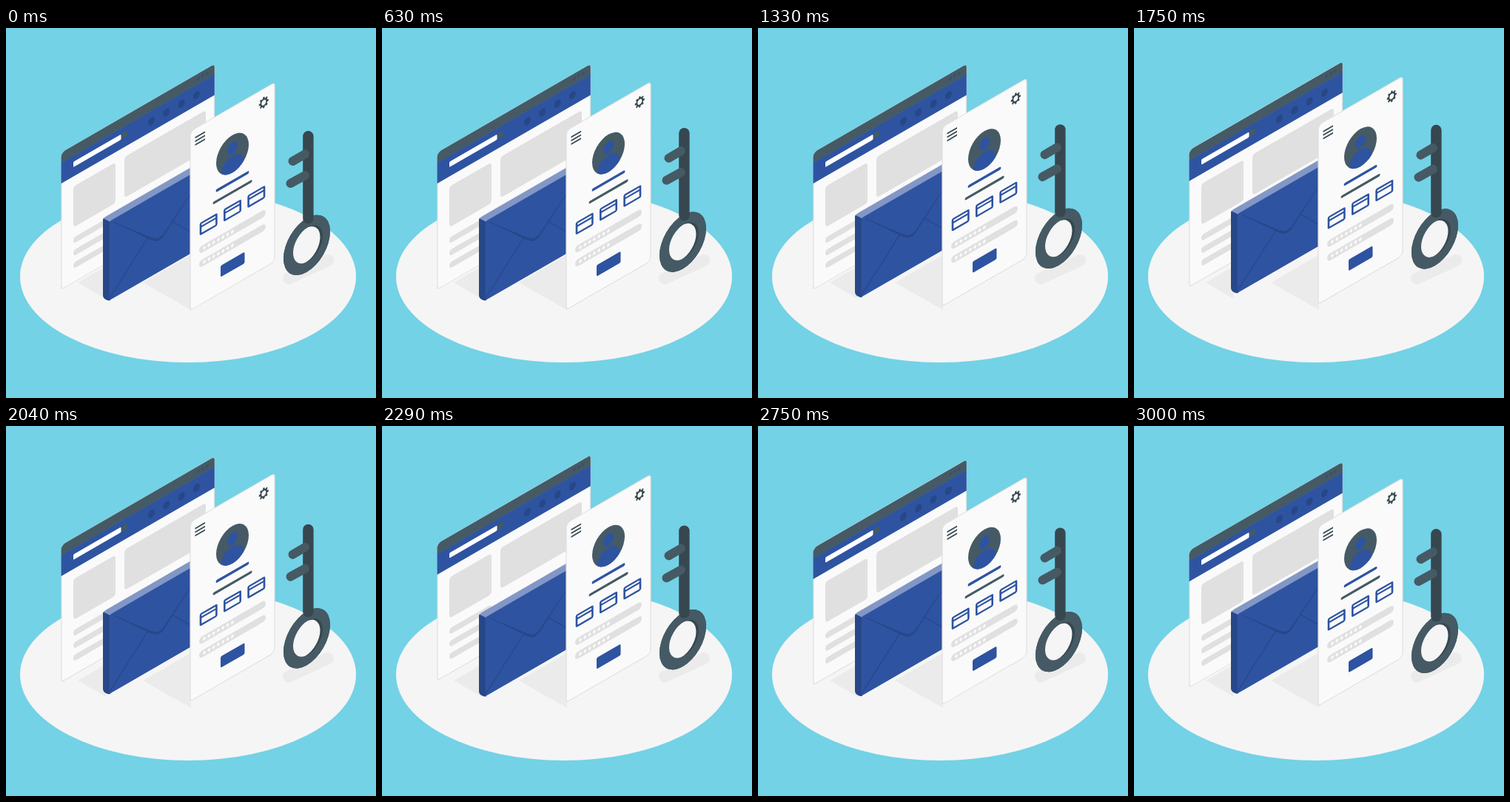
These frames come from a looping animation (500 px wide and 500 px high, 3.04 s). An HTML page with a canvas:

```html
<!DOCTYPE html>
<html lang="en">
<head>
<meta charset="utf-8">
<title>Floating account scene</title>
<style>
html, body { margin: 0; width: 100%; height: 100%; overflow: hidden; background: #73d2e6; }
canvas { display: block; width: 500px; height: 500px; }
</style>
</head>
<body>
<canvas id="stage"></canvas>
<script>
const canvas = document.getElementById('stage');
const ctx = canvas.getContext('2d');
const dpr = window.devicePixelRatio || 1;
canvas.width = canvas.height = 500 * dpr;

const LOOP = 3040, FPS = 24;
const SLOPE = Math.tan(Math.PI / 6), TALL = 2 / Math.sqrt(3);
const SKY = '#73d2e6', FLOOR = '#f5f5f5', SHADE = '#ebebeb', PAPER = '#fafafa', GREY = '#e0e0e0';
const BLUE = '#2e53a1', NAVY = '#274788', PALE = '#8297c6', SLATE = '#455a64', DARK = '#37474f';

// Linear rise and fall by 10px, starting after a delay
function lift(t, delay, period) {
  if (t < delay) return 0;
  const p = ((t - delay) / period) % 1;
  return 10 * (1 - Math.abs(2 * p - 1));
}

// Draw on an upright plane that recedes up to the right
function plane(x, y, draw) {
  ctx.save();
  ctx.transform(1, -SLOPE, 0, 1, x, y);
  draw();
  ctx.restore();
}

function raised(dy, draw) {
  ctx.save();
  ctx.translate(0, -dy);
  draw();
  ctx.restore();
}

function box(x, y, w, h, r, fill) {
  ctx.beginPath();
  ctx.roundRect(x, y, w, h, r);
  ctx.fillStyle = fill;
  ctx.fill();
}

function disc(x, y, r, fill) {
  ctx.beginPath();
  ctx.ellipse(x, y, r, r * TALL, 0, 0, 7);
  ctx.fillStyle = fill;
  ctx.fill();
}

function poly(points, fill) {
  ctx.beginPath();
  points.forEach(([x, y]) => ctx.lineTo(x, y));
  ctx.closePath();
  ctx.fillStyle = fill;
  ctx.fill();
}

function line(x1, y1, x2, y2, width, color, cap = 'round') {
  ctx.beginPath();
  ctx.moveTo(x1, y1);
  ctx.lineTo(x2, y2);
  ctx.lineWidth = width;
  ctx.strokeStyle = color;
  ctx.lineCap = cap;
  ctx.stroke();
}

function sheet(w, h, radii) {
  box(0, 0, w, h, radii, PAPER);
  ctx.strokeStyle = GREY;
  ctx.lineWidth = 1.2;
  ctx.stroke();
}

function floor() {
  ctx.fillStyle = SKY;
  ctx.fillRect(0, 0, 500, 500);
  ctx.beginPath();
  ctx.ellipse(246, 336, 227, 116, 0, 0, 7);
  ctx.fillStyle = FLOOR;
  ctx.fill();
  poly([[97, 344], [135, 366], [135, 322]], SHADE);
  poly([[185, 344], [250, 381], [250, 306.5]], SHADE);
  line(382, 338.5, 435, 314, 16, SHADE);
}

function browser() {
  plane(75, 168.5, () => {
    const radii = [6, 3.5, 3, 3];
    sheet(206.5, 184.5, radii);
    ctx.save();
    ctx.beginPath();
    ctx.roundRect(-0.5, -0.3, 207.3, 185, radii);
    ctx.clip();
    box(-1, -1, 209, 15, 0, SLATE);
    box(-1, 13.5, 209, 28, 0, BLUE);
    ctx.restore();
    for (let i = 0; i < 3; i++) disc(185 + i * 5.8, 6.6, 1.8, '#384f78');
    box(16, 21.7, 64.5, 7.2, 1.5, '#fff');
    box(81, 21.3, 8, 7.4, 2, SLATE);
    for (let i = 0; i < 4; i++) disc(121.5 + i * 20.3, 27.5, 4.4, NAVY);
    box(16, 55, 57, 55.2, 4, GREY);
    box(85, 55, 110, 55.2, 4, GREY);
    for (let i = 0; i < 3; i++) box(16, 124 + i * 17, 57, 8.4, 4, GREY);
  });
}

// Open path of the envelope flap, with its tip lowered by d
function flap(d) {
  ctx.beginPath();
  ctx.moveTo(146, 262.5);
  ctx.lineTo(196, 283.5 + d);
  ctx.quadraticCurveTo(206, 288 + d, 213, 278.5 + d);
  ctx.lineTo(252, 220);
}

function envelope() {
  poly([[131, 257.5], [136, 254], [260, 182.4], [260, 191.7], [140, 263], [134, 262]], PALE);
  ctx.beginPath();
  ctx.moveTo(131, 259);
  ctx.quadraticCurveTo(131.5, 257, 134, 258.5);
  ctx.lineTo(141, 262);
  ctx.lineTo(141, 368);
  ctx.quadraticCurveTo(138, 369, 135, 367);
  ctx.quadraticCurveTo(131, 365, 131, 361);
  ctx.fillStyle = NAVY;
  ctx.fill();

  ctx.beginPath();
  ctx.moveTo(139.5, 265);
  ctx.quadraticCurveTo(139.5, 261.5, 142, 260);
  ctx.lineTo(260, 191.7);
  ctx.lineTo(260, 298.7);
  ctx.lineTo(142, 366.8);
  ctx.quadraticCurveTo(139.5, 368.2, 139.5, 365);
  ctx.closePath();
  ctx.fillStyle = BLUE;
  ctx.fill();

  line(140, 365, 192, 283, 1.2, NAVY);
  line(226, 262, 252, 277, 1.2, NAVY);
  flap(3);
  ctx.fillStyle = NAVY;
  ctx.fill();
  flap(0);
  ctx.fillStyle = BLUE;
  ctx.fill();
  ctx.strokeStyle = NAVY;
  ctx.lineWidth = 0.8;
  ctx.stroke();
}

function gear(x, y) {
  ctx.save();
  ctx.translate(x, y);
  ctx.scale(1, TALL);
  for (let i = 0; i < 8; i++) {
    const a = i * Math.PI / 4, c = Math.cos(a), s = Math.sin(a);
    line(c * 4, s * 4, c * 6.5, s * 6.5, 2.2, DARK, 'butt');
  }
  ctx.beginPath();
  ctx.arc(0, 0, 4, 0, 7);
  ctx.lineWidth = 2;
  ctx.stroke();
  ctx.restore();
}

function avatar(x, y) {
  disc(x, y, 22, SLATE);
  ctx.save();
  ctx.clip();
  disc(x, y - 8, 7, BLUE);
  ctx.beginPath();
  ctx.ellipse(x, y + 17, 15, 14.5, 0, Math.PI, 0);
  ctx.lineTo(x + 15, y + 30);
  ctx.lineTo(x - 15, y + 30);
  ctx.fill();
  ctx.restore();
}

function tile(x, y) {
  ctx.beginPath();
  ctx.roundRect(x + 1.2, y + 1.2, 21.4, 14.6, 1);
  ctx.strokeStyle = BLUE;
  ctx.lineWidth = 2.6;
  ctx.stroke();
  line(x + 1, y + 6, x + 22.5, y + 6, 2.4, BLUE, 'butt');
}

function field(y) {
  box(12, y - 4.8, 90, 9.6, 4.8, GREY);
  for (let i = 0; i < 7; i++) disc(19 + i * 6.3, y, 1.9, PAPER);
}

function card() {
  plane(249, 139.5, () => {
    sheet(114, 242, [6, 4, 6, 3]);
    for (let i = 0; i < 3; i++) line(6.5, 12.6 + i * 4.8, 20, 12.6 + i * 4.8, 2, DARK, 'butt');
    gear(99.3, 18.5);
    avatar(57, 63.5);
    line(36.5, 100.8, 77.5, 100.8, 3.8, BLUE);
    line(32.3, 115.2, 81.8, 115.2, 3.6, SLATE);
    for (let i = 0; i < 3; i++) tile(12.8 + i * 32.3, 131.5);
    field(168.5);
    field(187.4);
    box(41, 205.5, 32.5, 15.3, 1.8, BLUE);
  });
}

function ring(hx, hy, color) {
  ctx.beginPath();
  ctx.ellipse(0, 0, 31.5, 31.5 * TALL, 0, 0, Math.PI * 2);
  ctx.closePath();
  ctx.moveTo(hx + 20, hy);
  ctx.ellipse(hx, hy, 20, 20 * TALL, 0, 0, Math.PI * 2);
  ctx.fillStyle = color;
  ctx.fill('evenodd');
}

function key() {
  plane(406.5, 293.3, () => {
    ring(-2, -0.4, DARK);
    ring(1.5, 0, SLATE);
  });
  line(408.4, 146.3, 408.4, 257.5, 14.4, DARK);
  line(387.5, 180, 404, 170.3, 12, SLATE);
  line(384.5, 210, 404, 199.2, 12, SLATE);
}

function draw(ms) {
  const t = Math.floor((ms + 4.9) * FPS / 1000) / FPS;
  ctx.setTransform(dpr, 0, 0, dpr, 0, 0);
  floor();
  raised(lift(t, 1.5, 1.5), browser);
  raised(lift(t, 1, 1.5), envelope);
  raised(lift(t, 0.5, 3), card);
  raised(lift(t, 0, 3), key);
}

const start = performance.now();
function tick(now) {
  draw(Math.max(0, now - start) % LOOP);
  requestAnimationFrame(tick);
}
draw(0);
requestAnimationFrame(tick);
</script>
</body>
</html>
```
